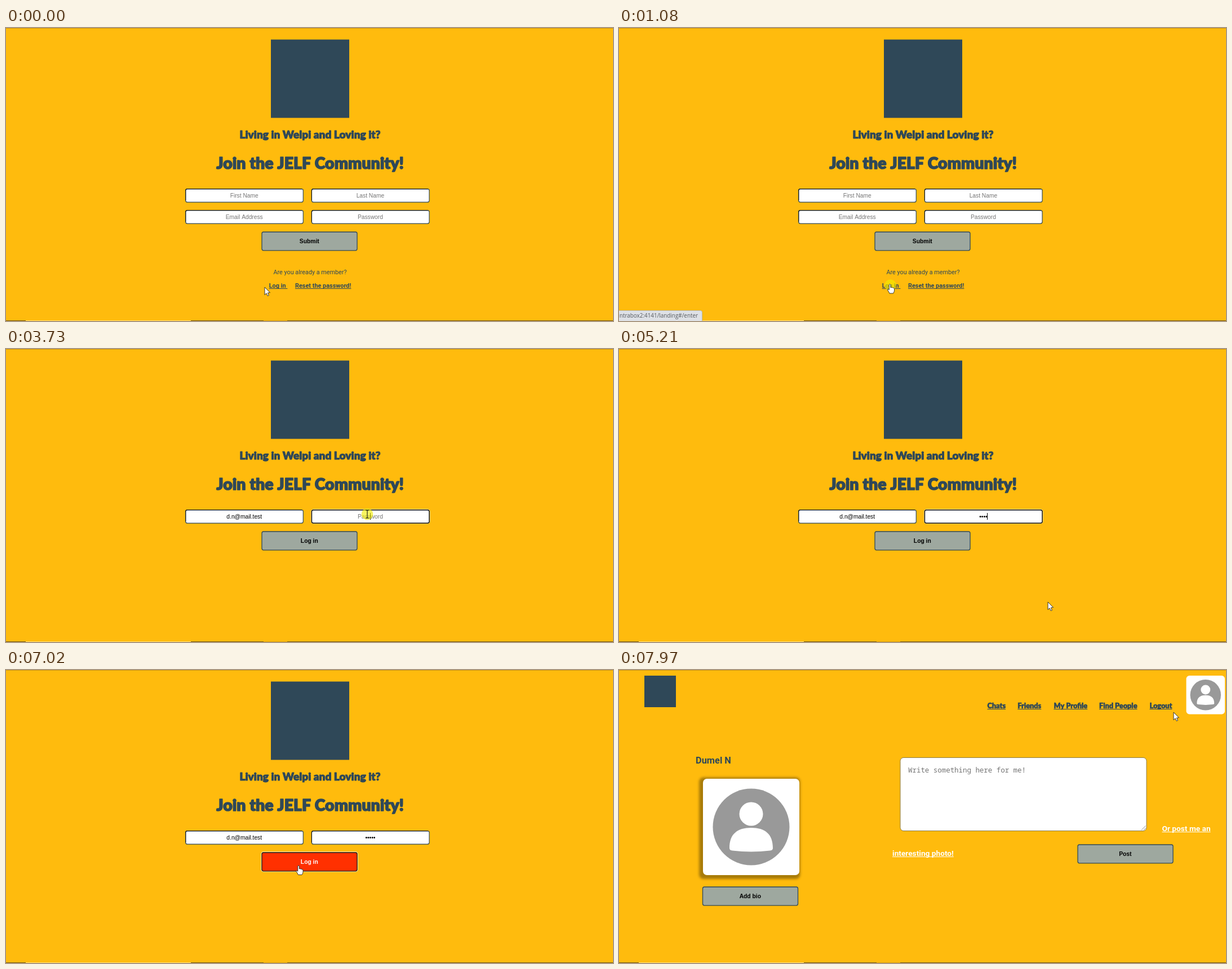
These frames come from a looping animation (1077x520 px, 8000 ms). An HTML page with a canvas:

```html
<!DOCTYPE html>
<html lang="en">
<head>
<meta charset="utf-8">
<title>Community login</title>
<style>
html, body { margin: 0; width: 100%; height: 100%; overflow: hidden; background: #ffbb0d; }
canvas { display: block; }
</style>
</head>
<body>
<canvas id="stage" width="1077" height="520"></canvas>
<script>
const ctx = document.getElementById('stage').getContext('2d');
const LOOP = 8000;
const NAVY = '#2f4858', YELLOW = '#ffbb0d', SAGE = '#9ea89f', RED = '#ff3000', HINT = '#757575';
const SANS = '"Liberation Sans", Arial, sans-serif';
const ROBOTO = 'Roboto, sans-serif';
const HEAVY = 'Lato, sans-serif';
const FIELD = '10.24px ' + SANS, BUTTON = 'bold 10.3px ' + SANS;
const EMAIL = 'd.n@mail.test';

// Pointer moves: first step, last step, step count, end point, curve control point
const START = [459, 460];
const MOVES = [
  [60, 370, 5, 505, 384, 470, 420],
  [450, 840, 6, 480.5, 454.5, 500, 425],
  [1330, 2010, 10, 425, 297, 430, 400],
  [3040, 3580, 8, 641, 293, 530, 290],
  [3810, 4050, 4, 761, 449, 700, 380],
  [6180, 6870, 10, 519, 347, 600, 350],
  [7570, 7720, 3, 733, 383, 620, 350],
  [7890, 7970, 2, 984, 75, 1040, 260]
];
const CLICKS = [[1010, 1180], [2180, 2240], [3730, 3810], [6950, 7020]];

const within = (t, a, b) => t >= a && t < b;
const inside = (p, x, y, w, h) => p[0] >= x && p[0] <= x + w && p[1] >= y && p[1] <= y + h;

function pointerAt(t) {
  let from = START;
  for (const [t0, t1, n, x, y, cx, cy] of MOVES) {
    if (t < t0) break;
    const gap = (t1 - t0) / (n - 1);
    const k = Math.min(n, Math.floor((t - t0) / gap + 1e-6) + 1) / n;
    const u = k * k * (3 - 2 * k), v = 1 - u;
    const at = (a, c, b) => v * v * a + 2 * u * v * c + u * u * b;
    from = [at(from[0], cx, x), at(from[1], cy, y)];
  }
  return from;
}

function box(x, y, w, h, r, fill, stroke, line = 1) {
  ctx.beginPath();
  ctx.roundRect(x, y, w, h, r);
  if (fill) { ctx.fillStyle = fill; ctx.fill(); }
  if (stroke) { ctx.strokeStyle = stroke; ctx.lineWidth = line; ctx.stroke(); }
}

function disc(x, y, r, fill) {
  ctx.beginPath();
  ctx.arc(x, y, r, 0, 7);
  ctx.fillStyle = fill;
  ctx.fill();
}

function text(s, x, y, font, color, align = 'left') {
  ctx.font = font;
  ctx.fillStyle = color;
  ctx.textAlign = align;
  ctx.fillText(s, x, y);
}

// Thickens the text drawn last with an outline of its own colour
function embolden(s, x, y, line) {
  ctx.strokeStyle = ctx.fillStyle;
  ctx.lineWidth = line;
  ctx.lineJoin = 'round';
  ctx.strokeText(s, x, y);
}

function heading(s, y, size) {
  text(s, 539.5, y, `900 ${size}px ${HEAVY}`, NAVY, 'center');
  embolden(s, 539.5, y, size / 20);
}

function link(s, x, y, font, color) {
  text(s, x, y, font, color);
  ctx.fillRect(x, Math.round(y + 1.2), ctx.measureText(s).width, 1);
}

function navLink(s, x) {
  link(s, x, 68, '900 12.7px ' + HEAVY, NAVY);
  embolden(s, x, 68, 0.6);
}

function field(x, y, value, color, focus, caret) {
  const mid = x + 104.7;
  if (focus) box(x - 0.4, y - 0.4, 210.8, 25.2, 4, null, '#ffe7a6', 1);
  box(x + 0.7, y + 0.7, 208.6, 23.4, 3, '#fff', focus ? '#0c0f12' : NAVY, focus ? 1.5 : 1.2);
  if (!focus) {
    ctx.beginPath();
    ctx.moveTo(x + 0.7, y + 21);
    ctx.arcTo(x + 0.7, y + 0.7, x + 10, y + 0.7, 3);
    ctx.lineTo(x + 207, y + 0.7);
    ctx.strokeStyle = '#141b21';
    ctx.lineWidth = 1.2;
    ctx.stroke();
  }
  text(value, mid, y + 15.7, FIELD, color, 'center');
  if (caret) {
    const w = color === HINT ? 0 : ctx.measureText(value).width / 2;
    ctx.fillStyle = '#000';
    ctx.fillRect(Math.floor(mid + w), y + 6, 1, 12);
  }
}

function button(label, x, y, hot, focus) {
  if (focus) box(x - 0.3, y - 0.3, 171.6, 35.1, 4, null, '#ffe7a6', 1.2);
  box(x + 1, y + 1, 169, 32.8, 3, hot ? RED : SAGE, hot ? '#1a1a1a' : NAVY, 1.3);
  text(label, x + 85.3, y + 20.5, BUTTON, hot ? '#fff' : '#000', 'center');
}

function avatar(x, y, size) {
  ctx.save();
  ctx.translate(x, y);
  ctx.scale(size / 171, size / 171);
  box(0, 0, 171, 171, size > 100 ? 7 : 14, '#fff');
  disc(85.5, 85.5, 68, '#999');
  disc(85.5, 62.5, 21, '#fff');
  ctx.fill(new Path2D('M47 123C47 98 61 87 85.5 87S124 98 124 123Q124 127 119 127.5Q85.5 131.5 52 127.5Q47 127 47 123Z'));
  ctx.restore();
}

function backdrop() {
  ctx.fillStyle = YELLOW;
  ctx.fillRect(0, 0, 1077, 520);
  ctx.fillStyle = '#c99512';
  ctx.fillRect(0, 0, 1077, 1);
  ctx.fillStyle = '#665018';
  ctx.fillRect(0, 519, 1077, 1);
  ctx.fillStyle = '#ffdf80';
  ctx.fillRect(35, 519, 293, 1);
  ctx.fillStyle = '#d09a14';
  ctx.fillRect(457, 519, 42, 1);
}

function welcome() {
  ctx.fillStyle = NAVY;
  ctx.fillRect(470, 20.5, 139, 139);
  heading('Living in Welpi and Loving it?', 196, 19.1);
  heading('Join the JELF Community!', 250, 28.5);
}

function signup(p) {
  welcome();
  field(318, 285, 'First Name', HINT);
  field(541.7, 285, 'Last Name', HINT);
  field(318, 323, 'Email Address', HINT);
  field(541.7, 323, 'Password', HINT);
  button('Submit', 453, 361, inside(p, 453, 361, 171, 35));
  text('Are you already a member?', 539.5, 437.3, '10.8px ' + ROBOTO, NAVY, 'center');
  const bold = 'bold 10.9px ' + ROBOTO;
  link('Log in ', 466.7, 461, bold, NAVY);
  link('Reset the password!', 513, 461, bold, NAVY);
}

function login(t, p) {
  welcome();
  const filled = t >= 2870;
  const dots = [4680, 4910, 5000, 5210, 5480].filter(k => t >= k).length;
  field(318, 285, filled ? EMAIL : 'Email Address', filled ? '#000' : HINT,
    within(t, 2180, 3730), within(t, 2180, 2720) || within(t, 2870, 3400));
  field(541.7, 285, dots ? '•'.repeat(dots) : 'Password', dots ? '#000' : HINT,
    within(t, 3730, 6950),
    within(t, 3730, 4280) || within(t, 4680, 6030) || within(t, 6580, 6950));
  button('Log in', 453, 323, inside(p, 453, 323, 171, 35), t >= 7020);
}

function profile() {
  ctx.fillStyle = NAVY;
  ctx.fillRect(45, 10, 56, 56);
  navLink('Chats', 653.5);
  navLink('Friends', 707.3);
  navLink('My Profile', 771.4);
  navLink('Find People', 852);
  navLink('Logout', 941.5);
  avatar(1006.5, 10, 68.5);

  text('Dumel N', 136, 165.5, 'bold 16.4px ' + ROBOTO, NAVY);
  ctx.filter = 'blur(2px)';
  box(142, 190.5, 179.5, 180.5, 8, 'rgba(0,0,0,.34)');
  ctx.filter = 'none';
  avatar(149, 193, 171);
  button('Add bio', 147.5, 384);

  box(499, 155.5, 437, 130, 6, '#fff', '#8b7a45');
  text('Write something here for me!', 513, 182, '12.44px "Noto Sans Mono", monospace', HINT);
  ctx.beginPath();
  ctx.moveTo(927, 284); ctx.lineTo(934.5, 276.5);
  ctx.moveTo(931, 284); ctx.lineTo(934.5, 280.5);
  ctx.strokeStyle = '#777';
  ctx.lineWidth = 0.8;
  ctx.stroke();
  const prompt = 'bold 13.7px ' + ROBOTO;
  link('Or post me an', 963.5, 286, prompt, '#fff');
  link('interesting photo!', 485, 329.7, prompt, '#fff');
  button('Post', 813, 309);
}

function statusBar() {
  box(-5, 501.5, 152.5, 25, 3, '#dee1e6', '#b9b6a5');
  text('intrabox2:4141/landing#/enter', 140, 514.3, '9.9px "Open Sans", sans-serif', '#55595e', 'right');
}

const ARROW = new Path2D('M0 0V13.6L3.1 10.8L5.2 15.5L7.4 14.5L5.4 10L9.5 9.7Z');
const HAND = new Path2D('M-1.3 1Q0 -1 1.3 1V6Q2.6 4.8 3.8 6.3Q5 5.3 6 6.9Q7.6 6.2 8 8V12Q7.5 14.5 6 16.5H-.5Q-1.5 14 -4 10.5Q-4.5 8.7 -2.7 9L-1.3 10.3Z');
const BEAM = new Path2D('M-3 -7H-1Q0 -7 0 -6Q0 -7 1 -7H3M0 -6V6M-3 7H-1Q0 7 0 6Q0 7 1 7H3');

function cursorKind(t, p) {
  if (t < 1330) return inside(p, 466, 450, 33, 15) || inside(p, 453, 361, 171, 35) ? 'hand' : 'arrow';
  if (t < 7570) {
    if (inside(p, 453, 323, 171, 35)) return 'hand';
    return inside(p, 318, 285, 210, 25) || inside(p, 541.7, 285, 210, 25) ? 'beam' : 'arrow';
  }
  return 'arrow';
}

function pointer(t, p) {
  const kind = cursorKind(t, p);
  if (CLICKS.some(([a, b]) => within(t, a, b)))
    disc(p[0] + (kind === 'hand' ? 1 : 0), p[1] + (kind === 'hand' ? 2 : 0), 10.3, 'rgba(242,238,0,.62)');
  ctx.save();
  ctx.translate(p[0], p[1]);
  ctx.lineJoin = 'round';
  if (kind === 'beam') {
    ctx.strokeStyle = '#111';
    ctx.lineWidth = 1.1;
    ctx.stroke(BEAM);
  } else {
    const shape = kind === 'hand' ? HAND : ARROW;
    ctx.fillStyle = '#fff';
    ctx.fill(shape);
    ctx.strokeStyle = '#222';
    ctx.lineWidth = 0.9;
    ctx.stroke(shape);
  }
  ctx.restore();
}

function draw(t) {
  const p = pointerAt(t);
  backdrop();
  if (t < 1180) signup(p);
  else if (t < 7190) login(t, p);
  else profile();
  if (within(t, 840, 1400)) statusBar();
  pointer(t, p);
}

const begin = performance.now();
function tick() {
  draw((performance.now() - begin) % LOOP);
  requestAnimationFrame(tick);
}
tick();
</script>
</body>
</html>
```
